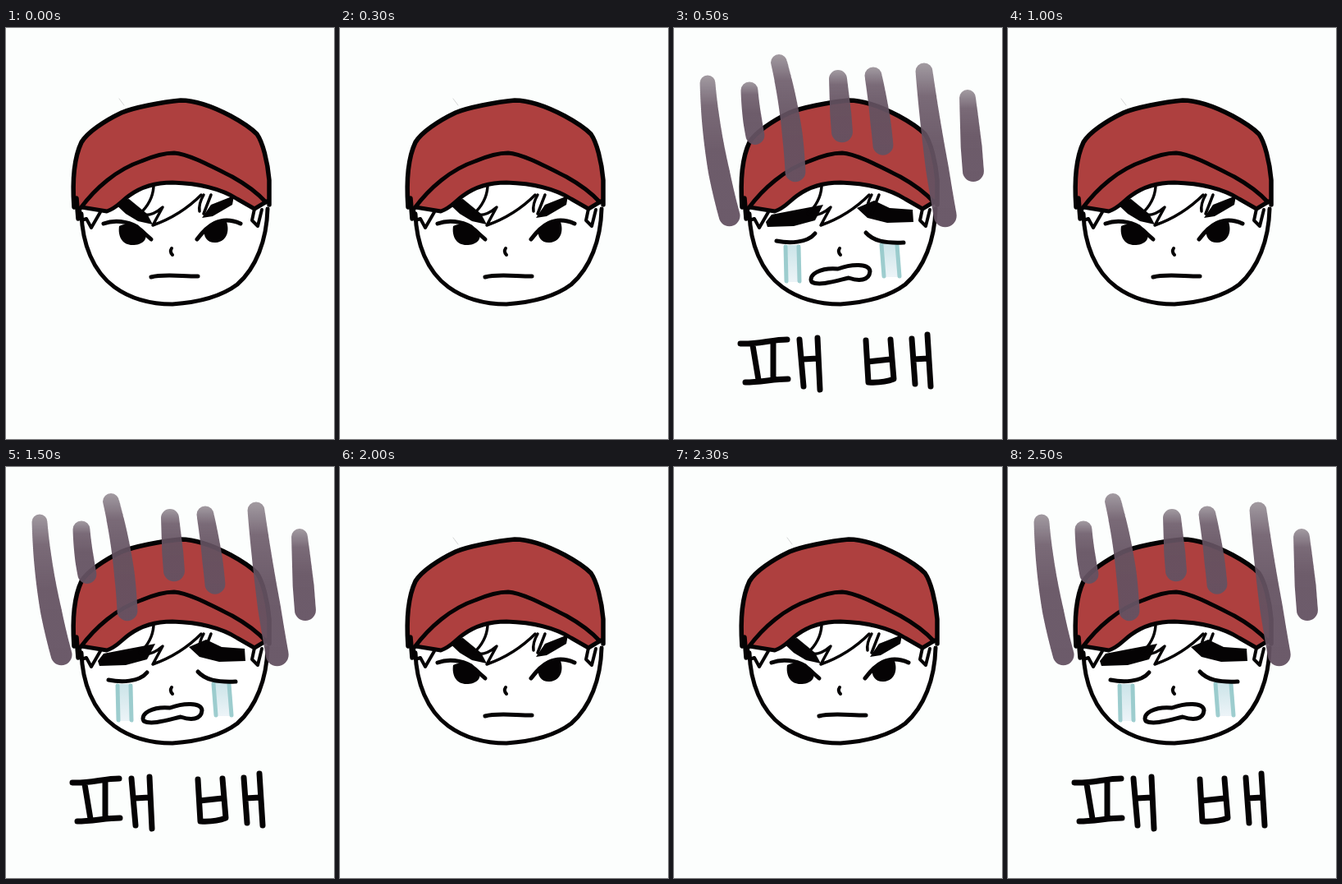
An HTML page with a canvas that plays this animation: 400x500 px, repeating every 3 s.

```html
<!DOCTYPE html>
<html lang="ko">
<head>
<meta charset="utf-8">
<title>패배</title>
<style>
html, body { margin: 0; width: 100%; height: 100%; overflow: hidden; background: #fcfefd; }
canvas { display: block; }
</style>
</head>
<body>
<canvas id="stage" width="400" height="500" role="img" aria-label="패배"></canvas>
<script>
const ctx = document.getElementById('stage').getContext('2d');
const INK = '#050304', RED = '#ae403f', PAPER = '#fcfefd';
const HALF = 500;

function line(d, width = 5, color = INK) {
  ctx.lineWidth = width;
  ctx.strokeStyle = color;
  ctx.stroke(new Path2D(d));
}

function fill(d, color = INK) {
  ctx.fillStyle = color;
  ctx.fill(new Path2D(d));
}

const FACE = 'M92 226C93 262 106 296 132 315C154 331 180 336 203 336C232 334 262 327 282 312C305 292 318 258 319 220';
const DOME = 'M88 232L86 207L83 218C81 190 82 160 92 139C99 127 120 113 141 103C155 97 190 90 213 88C232 88 255 97 274 107C287 114 298 121 306 129C313 139 319 162 321 185L321 215';
const BRIM_TOP = 'M91 219C109 195 135 172 165 162C184 154 194 152 205 152C222 153 250 168 276 181C294 191 307 201 317 212';
const BRIM_LOW = 'M92 218L123 223C135 219 139 212 150 204C165 193 183 188 203 188C235 189 263 196 282 208L303 220L318 211';
const CAP = 'M88 218L83 208C81 185 82 160 92 139C99 127 120 113 141 103C155 97 190 90 213 88C232 88 255 97 274 107L306 129C313 139 319 162 321 185L319 211L303 220L282 208C263 196 235 189 203 188C183 188 165 193 150 204C139 212 135 219 123 223Z';

function drawHead() {
  fill(FACE + 'L300 150L110 150Z', '#fff');
  line(FACE);
}

function drawCapAndHair() {
  line('M90 221L92 234L98 232L104 243L115 224', 4);
  line('M303 220L300 234L307 241L312 221', 4);
  fill(CAP, RED);
  line(DOME, 5.5);
  line(BRIM_TOP);
  line(BRIM_LOW);
  line('M202 268C200 271 201 274 203 276', 4);
}

function drawBangs() {
  line('M180 193C179 207 172 218 163 226', 3.5);
  line('M163 226C173 230 183 225 191 218L179 240C199 233 219 222 238 203', 3.5);
  line('M241 203C237 210 235 217 236 223M250 203L241 226', 3.5);
}

function drawAngry() {
  line('M138 86L144 94', 1, '#d5d7d6');
  drawHead();
  fill('M130 211L150 208L172 226L179 239L161 235L146 226Z');
  fill('M278 204L276 215L252 229L239 231L250 215Z');
  drawBangs();
  line('M119 238C132 233 148 235 160 242L177 257');
  line('M233 257C245 241 261 227 286 238');
  fill('M138 241C151 235 163 240 170 248C173 258 166 264 154 264C143 264 136 255 138 241Z');
  fill('M242 245C250 235 262 231 269 236C273 247 269 260 256 261C247 262 240 255 242 245Z');
  line('M177 303C191 299 213 302 234 302');
  drawCapAndHair();
}

function drawTear(x, y, width, height, slant) {
  const wash = ctx.createLinearGradient(0, y, 0, y + height);
  wash.addColorStop(0, '#cbe4e8');
  wash.addColorStop(1, '#edf4f8');
  fill(`M${x} ${y}h${width}l${slant} ${height}h${-width}Z`, wash);
  const edge = `l${slant} ${height - 3}`;
  line(`M${x + 2} ${y + 2}${edge}M${x + width - 2} ${y + 2}${edge}`, 5, 'rgba(145,199,200,.85)');
}

// A brush stroke that widens from r0 to r1 and grows denser downwards.
function drawGloom(x0, y0, x1, y1, r0, r1, bend = 0) {
  const shade = ctx.createLinearGradient(0, y0 - r0, 0, y1 + r1);
  shade.addColorStop(0, 'rgba(102,88,100,.6)');
  shade.addColorStop(0.2, 'rgba(100,82,97,.86)');
  shade.addColorStop(0.5, 'rgba(100,82,97,.94)');
  shade.addColorStop(1, 'rgba(100,82,98,.95)');
  const brush = new Path2D();
  for (let t = 0; t <= 1; t += 0.01) {
    const x = x0 + (x1 - x0) * t + 2 * bend * t * (1 - t);
    const y = y0 + (y1 - y0) * t;
    const r = r0 + (r1 - r0) * Math.min(1, t * 1.5);
    brush.moveTo(x + r, y);
    brush.arc(x, y, r, 0, Math.PI * 2);
  }
  ctx.fillStyle = shade;
  ctx.fill(brush);
}

function drawLettering() {
  line('M81 384C101 385 120 379 138 379M96 386L103 428M121 383L121 426M87 431C105 431 122 427 139 427', 7);
  line('M153 379L158 436M157 403L175 402M175 377L178 440', 7);
  line('M234 380L237 431Q255 432 268 427L264 379M236 406L264 403', 7);
  line('M290 378L294 433M292 403L310 402M309 373L313 436', 7);
}

function drawDefeated() {
  drawHead();
  fill('M112 236L119 227L145 222L182 215L172 234L146 241L114 242Z');
  fill('M223 219L244 210L263 219L291 221L292 236L260 237L236 231Z');
  drawBangs();
  drawTear(134, 264, 20, 45, 1);
  drawTear(251, 262, 23, 41, 3);
  line('M125 259C140 262 162 262 172 250');
  line('M234 249C243 259 257 262 280 261');
  line('M200 293C216 287 238 286 239 296C238 308 225 308 213 304C196 308 177 314 168 309C163 300 179 291 200 293Z');
  drawCapAndHair();
  ctx.filter = 'blur(0.5px)';
  drawGloom(41, 67, 68, 230, 9.5, 13, -9);
  drawGloom(92, 76, 99, 131, 10.5, 11.5, -2);
  drawGloom(128, 42, 148, 176, 10, 12.5, 7);
  drawGloom(200, 62, 205, 127, 11, 13);
  drawGloom(243, 58, 255, 143, 10.5, 12.5, 2);
  drawGloom(305, 53, 331, 230, 10.5, 14, -3);
  drawGloom(358, 85, 365, 175, 10, 13);
  ctx.filter = 'none';
  drawLettering();
}

function draw(time) {
  ctx.fillStyle = PAPER;
  ctx.fillRect(0, 0, 400, 500);
  if (Math.floor(time / HALF) % 2) drawDefeated();
  else drawAngry();
}

ctx.lineCap = ctx.lineJoin = 'round';
const start = performance.now();

function loop() {
  draw(performance.now() - start);
  requestAnimationFrame(loop);
}
loop();
</script>
</body>
</html>
```
